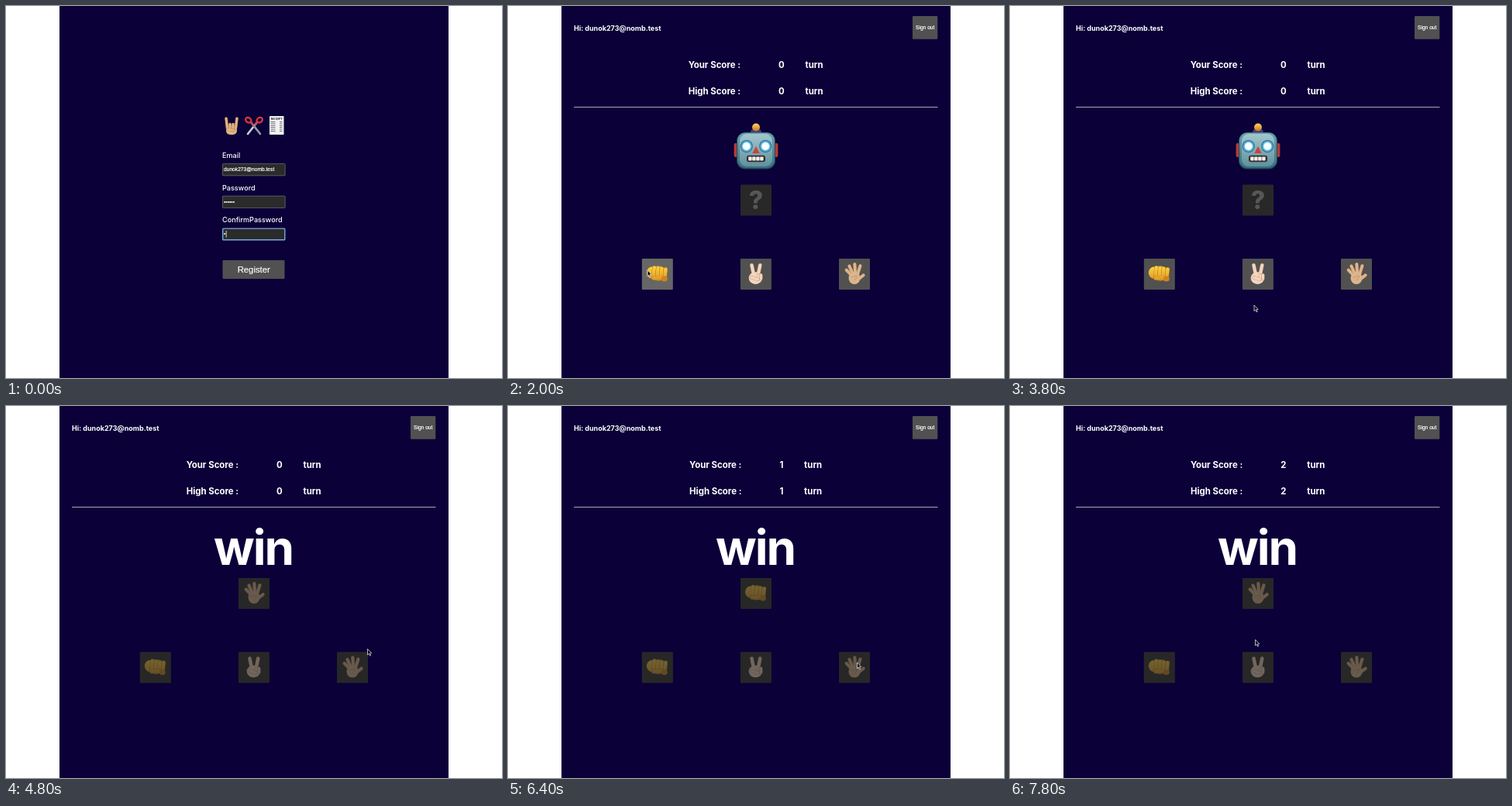
Animation, 640 px wide and 480 px high, one loop 8000 ms. Source, as an HTML page with a canvas:

```html
<!DOCTYPE html>
<html lang="en">
<head>
<meta charset="utf-8">
<title>Hand game</title>
<style>
  html, body { margin: 0; width: 100%; height: 100%; overflow: hidden; background: #fff; }
  canvas { display: block; width: 640px; height: 480px; }
</style>
</head>
<body>
<canvas id="stage" width="640" height="480"></canvas>
<script>
const ctx = document.getElementById('stage').getContext('2d');
const LOOP = 8000, STEP = 200;
const UI = 'Inter, sans-serif', FIELD = '"Liberation Sans", Arial, sans-serif';
const EMAIL = 'dunok273@nomb.test';
const GREY = '#515151', HOVER = '#666', DIM = '#282828', VEIL = 'rgba(40, 40, 40, 0.64)';

const LOGIN_END = 1200, RESULT_TIME = 1000;
const CLICKS = [2400, 4200, 5800, 7200];

// Where the pointer rests or turns: time, x, y
const STOPS = [
  [600, 322, 372], [1000, 315, 340], [2000, 180, 341], [3200, 269.5, 316.5],
  [3800, 315, 386], [4200, 318, 342], [4800, 466.5, 313.5], [5400, 450.5, 331],
  [6400, 450.5, 331], [7000, 318, 335], [7800, 316.5, 301.5]
];

function rect(x, y, w, h, color, r = 1) {
  ctx.fillStyle = color;
  ctx.beginPath();
  ctx.roundRect(x, y, w, h, r);
  ctx.fill();
}

function ellipse(x, y, rx, ry, color) {
  ctx.fillStyle = color;
  ctx.beginPath();
  ctx.ellipse(x, y, rx, ry, 0, 0, Math.PI * 2);
  ctx.fill();
}

function trace(points) {
  ctx.beginPath();
  points.forEach(([x, y]) => ctx.lineTo(x, y));
  ctx.closePath();
}

function bar(x1, y1, x2, y2, width, color) {
  ctx.strokeStyle = color;
  ctx.lineWidth = width;
  ctx.lineCap = 'round';
  ctx.beginPath();
  ctx.moveTo(x1, y1);
  ctx.lineTo(x2, y2);
  ctx.stroke();
}

function text(str, x, y, size, { family = UI, weight = 400, color = '#fff', align = 'left', gap = 0 } = {}) {
  ctx.font = `${weight} ${size}px ${family}`;
  ctx.letterSpacing = gap + 'px';
  ctx.textAlign = align;
  ctx.fillStyle = color;
  ctx.fillText(str, x, y);
  if (family === FIELD) {
    ctx.strokeStyle = color;
    ctx.lineWidth = 0.2;
    ctx.strokeText(str, x, y);
  }
}

function shade(y1, y2, top, bottom) {
  const g = ctx.createLinearGradient(0, y1, 0, y2);
  g.addColorStop(0, top);
  g.addColorStop(1, bottom);
  return g;
}

function place(draw, x, y) {
  ctx.save();
  ctx.translate(x, y);
  draw();
  ctx.restore();
}

// An outlined finger; angle 0 points up
function finger(x, y, angle, length, width, skin) {
  const tx = x + Math.sin(angle) * length, ty = y - Math.cos(angle) * length;
  bar(x, y, tx, ty, width, skin.edge);
  bar(x, y, tx, ty, width - 0.9, skin.fill);
}

function fist() {
  const skin = { fill: shade(-11, 11, '#ffd942', '#dd9220'), edge: '#b87a1e' };
  ellipse(-7, -1, 7, 7.5, skin.fill);
  ellipse(1, 0, 11, 9.5, skin.fill);
  for (let i = 0; i < 4; i++) finger(-5 + i * 4.9, 3, 0.1, 10.5 - i * 0.7, 5.4, skin);
  finger(-5, 6, 1.5, 11, 5.4, skin);
  ellipse(9, 7, 4, 3.5, '#cf8421');
}

function palm() {
  const skin = { fill: '#dcb58d', edge: '#ad805b' };
  for (let i = 0; i < 4; i++) {
    finger(-4 + i * 2.6, 2, -0.78 + i * 0.36, 9 + 5 * Math.sin(i * 0.8), 4.4, skin);
  }
  finger(3, 9, 0.9, 11, 4.4, skin);
  ellipse(0, 6, 7.5, 8, skin.fill);
  bar(-4, 5, 3, 3, 0.6, skin.edge);
  bar(0, 9, 4, 4, 0.6, skin.edge);
}

function victory() {
  const skin = { fill: '#f4d5bd', edge: '#bf957c' };
  for (const side of [-1, 1]) finger(side * 2.4, 4, side * 0.2, 15, 4.8, skin);
  ellipse(-0.5, 6, 8.8, 7.8, skin.fill);
  for (const x of [3, 6.5]) finger(x, 7, 0, 5, 4.2, skin);
  finger(-6, 5, 1.9, 9, 4.4, skin);
}

function horns() {
  const skin = { fill: '#dfb685', edge: '#a9794c' };
  rect(-7, 0, 14, 12, skin.fill, 5);
  for (let i = 0; i < 4; i++) {
    const raised = i % 3 === 0;
    finger(-5.4 + i * 3.6, 4, (i - 1.5) * 0.08, raised ? 13 : 5.5, 3.7, skin);
  }
  finger(-5, 5, 1.75, 7.5, 3.8, skin);
}

function scissors() {
  for (const side of [-1, 1]) bar(-4 * side, -4, 8 * side, 11, 2.6, side < 0 ? '#c9d1da' : '#919eac');
  for (const side of [-1, 1]) {
    bar(4.5 * side, -4.5, 1.5 * side, -1, 2.2, '#dc3941');
    ctx.beginPath();
    ctx.ellipse(7.2 * side, -6.8, 3.9, 3, side * -0.55, 0, Math.PI * 2);
    ctx.stroke();
  }
  ellipse(0, 1, 1, 1, '#626c78');
}

function receipt() {
  rect(-9, -12, 18.5, 24, '#f1f2f2', 0.5);
  text('RECEIPT', 0.2, -7.4, 3.5, { weight: 700, color: '#20222b', align: 'center' });
  for (let i = 0; i < 6; i++) {
    const y = -5 + i * 2.4;
    rect(-7.5, y, 6, 0.9, '#5d5f68', 0);
    rect(4, y, 3.5, 0.9, '#5d5f68', 0);
  }
}

function robot() {
  ellipse(0, -19, 7, 4, '#483b75');
  ellipse(0, -24.5, 5, 5, shade(-29, -20, '#ffd35b', '#c9782a'));
  for (const side of [-1, 1]) rect(side * 26 - 2.4, -4, 4.8, 18, '#b83a38', 2);
  rect(-25, -18, 50, 47.5, '#244955', 11);
  rect(-24, -17.5, 48, 45.5, shade(-18, 28, '#69a2b1', '#3b7080'), 10);
  rect(-21, -16, 42, 42, shade(-16, 26, '#a3c6cd', '#5f919e'), 9);
  for (const side of [-1, 1]) {
    ellipse(side * 12.2, 0, 8, 8, '#28678a');
    ellipse(side * 12.2, 0, 7, 7, '#57b6df');
    ellipse(side * 12.2, 0, 5, 5, '#f8fdff');
  }
  trace([[0, 0], [4.7, 9], [-4.7, 9]]);
  ctx.fillStyle = '#cf4036';
  ctx.fill();
  rect(-12, 11.8, 24, 8.5, '#332b30', 3);
  for (let i = 0; i < 4; i++) rect(-9.8 + i * 5, 13.6, 4.4, 4.8, '#f1eee5', 0.6);
}

function pointerAt(t) {
  if (t < STOPS[0][0]) return null;
  const next = STOPS.findIndex(s => s[0] >= t);
  const [t2, x2, y2] = STOPS[next];
  const [t1, x1, y1] = STOPS[Math.max(0, next - 1)];
  const u = t2 > t1 ? (t - t1) / (t2 - t1) : 1;
  const k = u * u * (3 - 2 * u);
  return { x: x1 + (x2 - x1) * k, y: y1 + (y2 - y1) * k };
}

function arrow() {
  trace([[0, 0], [0, 7.6], [1.8, 6], [3, 8.8], [4.2, 8.3], [3, 5.6], [5.2, 5.4]]);
  ctx.lineJoin = 'round';
  ctx.lineWidth = 0.8;
  ctx.strokeStyle = '#dcdce2';
  ctx.fillStyle = '#0a0712';
  ctx.fill();
  ctx.stroke();
}

function button(x, y, w, h, p) {
  const over = p && p.x >= x && p.x <= x + w && p.y >= y && p.y <= y + h;
  rect(x, y, w, h, over ? HOVER : GREY);
}

function field(label, y, value, focus) {
  const edge = focus ? 1.4 : 0.8;
  text(label, 279, y - 7.3, 9.1, { weight: 500 });
  rect(279, y, 81.5, 16, focus ? '#79a9dc' : '#6d6d6d', 1.5);
  rect(279 + edge, y + edge, 81.5 - 2 * edge, 16 - 2 * edge, '#2b2b2b', 0.5);
  text(value, 281, y + 10, 6.67, { family: FIELD });
  if (focus) rect(281.4 + ctx.measureText(value).width, y + 3.5, 0.8, 8.5, '#fff', 0);
}

function login(t, p) {
  [horns, scissors, receipt].forEach((icon, i) => place(icon, 291 + i * 29, 154));
  const typed = Math.min(6, 1 + 2 * t / STEP);
  const values = { Email: EMAIL, Password: '•'.repeat(6), ConfirmPassword: '•'.repeat(typed) };
  Object.entries(values).forEach(([label, value], i) => {
    field(label, 203.2 + i * 41.6, value, i === 2 && t < 1000);
  });
  button(279.5, 328, 80, 24, p);
  text('Register', 319.7, 343.6, 11.3, { family: FIELD, align: 'center' });
}

function scoreRow(label, y, score) {
  const bold = { weight: 700 };
  text('turn', 700, y, 11.4, bold);
  const shift = (ctx.measureText('0').width - ctx.measureText(score).width) / 2;
  text(label, 232.7 + shift, y, 11.4, bold);
  text(score, 349 + shift, y, 11.4, bold);
  text('turn', 383.5 - shift, y, 11.4, bold);
}

function game(t, p) {
  const round = CLICKS.findIndex(c => t >= c && t < c + RESULT_TIME);
  const done = round >= 0;
  const ended = CLICKS.filter(c => t >= c + RESULT_TIME).length;
  const score = String(Math.max(0, ended - 1)); // the first round is a draw

  text('Hi: ' + EMAIL, 85, 31.5, 9, { weight: 700 });
  rect(522, 13, 32.3, 29.7, GREY);
  text('Sign out', 538.2, 30.3, 6.67, { family: FIELD, align: 'center' });
  scoreRow('Your Score :', 79.8, score);
  scoreRow('High Score :', 113.6, score);
  rect(85, 130, 469.5, 1, '#aaa5b8', 0);

  const top = done ? 222 : 230.6;
  rect(300, top, 40, 39.8, DIM);
  if (done) {
    text(round ? 'win' : 'draw', 319, 205, 62, { weight: 700, align: 'center', gap: -2 });
    place(round % 2 ? palm : fist, 320, top + 19);
    rect(300, top, 40, 39.8, VEIL);
  } else {
    place(robot, 320, 181);
    text('?', 320, 262, 32, { weight: 800, color: '#575757', align: 'center' });
  }

  const y = top + 95.5;
  [fist, victory, palm].forEach((hand, i) => {
    const x = 172.8 + i * 127.1;
    if (done) rect(x, y, 40, 39.8, DIM);
    else button(x, y, 40, 39.8, p);
    place(hand, x + 20, y + 19);
    if (done) rect(x, y, 40, 39.8, VEIL);
  });
}

function frame(now) {
  const t = Math.floor(now % LOOP / STEP) * STEP;
  const p = pointerAt(t);
  rect(0, 0, 640, 480, '#fff', 0);
  rect(69, 0, 502, 480, '#0b0038', 0);
  if (t < LOGIN_END) login(t, p);
  else game(t, p);
  if (p) place(arrow, p.x, p.y);
}

const start = performance.now();
function tick() {
  frame(performance.now() - start);
  requestAnimationFrame(tick);
}
tick();
</script>
</body>
</html>
```
